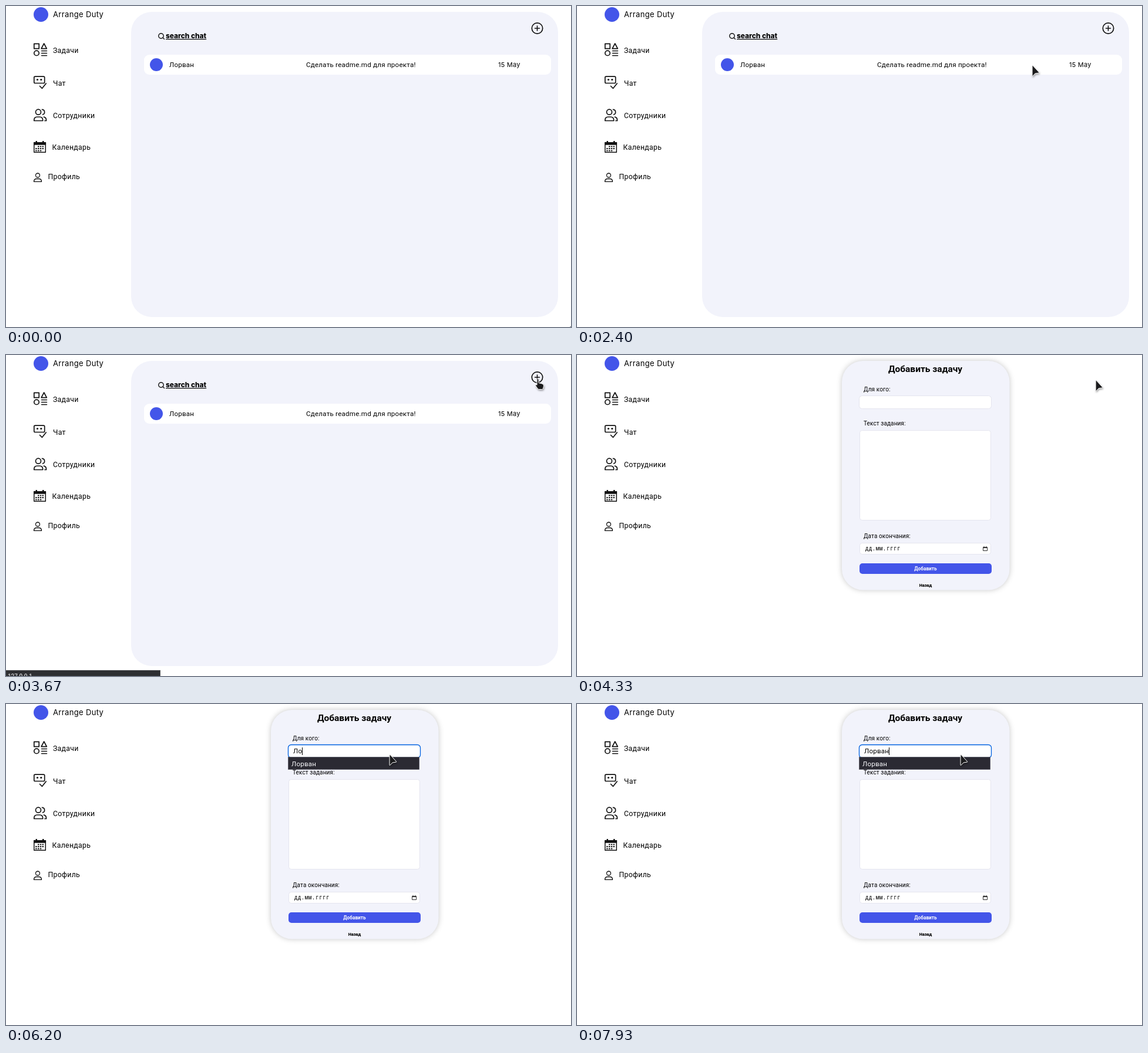
Animation, 962 px wide and 547 px high, one loop 8000 ms. Source, as an HTML page:

```html
<!DOCTYPE html>
<html lang="ru">
<head>
<meta charset="utf-8">
<title>Task board</title>
<style>
html, body { margin: 0; width: 100%; height: 100%; overflow: hidden; background: #fff; }
svg { display: block; width: 962px; height: 547px; font-family: Roboto, "Open Sans", sans-serif; }
text { fill: #000; }
.wide { font-family: Inter, sans-serif; }
.nav { font-size: 12.3px; letter-spacing: .3px; }
.row { font-size: 11.6px; letter-spacing: .22px; }
.label { font-size: 10px; letter-spacing: .1px; }
.icon { fill: none; stroke: #111; stroke-width: 1.7; stroke-linejoin: round; stroke-linecap: round; }
.solid { fill: #111; stroke: none; }
.field { fill: #fff; stroke: #e5e5ef; }
.card { filter: drop-shadow(0 0 5px rgba(0, 0, 0, .22)); }
.pointer { filter: drop-shadow(1px 2px 1.5px rgba(0, 0, 0, .35)); }
.pointer path { fill: #1b1b1d; stroke: #fff; stroke-width: 1; stroke-linejoin: round; }
</style>
</head>
<body>
<svg viewBox="0 0 962 547">
  <circle cx="59.5" cy="14.5" r="12.5" fill="#4355e9"/>
  <text class="wide" x="80" y="19" font-size="13" letter-spacing=".35">Arrange Duty</text>

  <g class="nav">
    <text x="80" y="80">Задачи</text>
    <text x="80" y="136">Чат</text>
    <text x="80" y="191">Сотрудники</text>
    <text x="78.5" y="245">Календарь</text>
    <text x="71.5" y="295">Профиль</text>
  </g>

  <g class="icon">
    <path d="M47.8 64.300h8.400v8.400H47.800zM64.700 64l4.600 8.700h-9.200z"/>
    <circle cx="52" cy="80.300" r="4.200"/>
    <path d="M60.500 76.500h9M60.500 80.500h9M60.500 84.500h9" stroke-width="1.500"/>
    <path d="M54 131.500h-4.500q-1.700 0-1.700-1.700v-8q0-1.700 1.700-1.700h14.500q1.700 0 1.700 1.700v8q0 1.700-1.700 1.700H54"/>
    <path d="M57.500 136.500l4 3.800 6.700-8.300"/>
    <g class="solid"><circle cx="53.500" cy="125.500" r="1.600"/><circle cx="59.800" cy="125.500" r="1.600"/></g>
    <circle cx="55" cy="180.700" r="4.500"/>
    <path d="M47.800 195.500v-1q0-5.500 5.500-5.500h3.800q5.500 0 5.500 5.500v1zM61.500 176.400a4.400 4.400 0 0 1 1 8.600M64.500 189.200q4 .8 4 5.300v1h-2.500"/>
    <g stroke-width="1.300">
      <circle cx="54" cy="288.500" r="3.500"/>
      <path d="M47.500 299.400q0-4.900 4.500-4.900h4q4.500 0 4.500 4.900z"/>
    </g>
    <path d="M47.800 233h19.500v16.200H47.800z" stroke-width="1.500"/>
    <path class="solid" d="M47.100 232h21v4.700h-21zM50.500 230h2.500v4h-2.500zM62 230h2.500v4H62z"/>
    <path d="M54 239.500h11.500M50.200 243h15.300M50.200 246.500h11.500" stroke-width="2" stroke-linecap="butt" stroke-dasharray="2.400 1.400"/>
  </g>

  <g id="list">
    <rect x="213" y="10" width="727" height="520" rx="35" fill="#f2f3fb"/>
    <g class="icon">
      <circle cx="264" cy="51" r="4.200" stroke-width="1.400"/>
      <path d="M267 54l2.500 2.500" stroke-width="1.400"/>
      <circle cx="904.500" cy="38" r="9.200"/>
      <path d="M900.500 38h8M904.500 34v8" stroke-width="1.600"/>
    </g>
    <text class="wide" x="272" y="55" font-size="11.9" font-weight="800" text-decoration="underline">search chat</text>
    <rect x="235" y="83" width="693" height="34" rx="9" fill="#fff"/>
    <circle cx="256" cy="100" r="11" fill="#4355e9"/>
    <g class="row">
      <text x="278" y="104">Лорван</text>
      <text x="511" y="104">Сделать readme.md для проекта!</text>
      <text class="wide" x="838" y="104" font-size="11">15 May</text>
    </g>
  </g>

  <g id="form">
    <rect class="card" x="451" y="10" width="285.500" height="390.500" rx="36" fill="#f2f3fb"/>
    <text x="593" y="29" font-size="15.500" font-weight="600" text-anchor="middle">Добавить задачу</text>
    <g class="label">
      <text x="488" y="62">Для кого:</text>
      <text x="488" y="120">Текст задания:</text>
      <text x="488" y="312">Дата окончания:</text>
    </g>
    <rect id="who" class="field" x="480.500" y="69.500" width="225" height="22" rx="5"/>
    <rect class="field" x="481.500" y="128.500" width="223" height="153" rx="4"/>
    <rect class="field" x="481.500" y="320.500" width="223" height="19" rx="4"/>
    <text x="490.500" y="333" font-size="10" font-weight="500" style="font-family:'Noto Sans Mono',monospace">дд.мм.гггг</text>
    <path d="M691.500 327.500h7v6h-7zM691.500 328.500h7M693 326v1M697 326v1" fill="none" stroke="#333"/>
    <rect x="481" y="355" width="225" height="18" rx="5" fill="#4355e9"/>
    <text x="593.500" y="367" font-size="8.300" font-weight="700" text-anchor="middle" style="fill:#fff">Добавить</text>
    <text x="593.500" y="395" font-size="7.300" font-weight="800" text-anchor="middle">Назад</text>
    <text id="typed" class="row" x="489" y="84"></text>
    <path id="caret" d="M.5 74v13" stroke="#000"/>
    <g id="menu">
      <rect x="480.500" y="90.500" width="223" height="21" fill="#2b2a33" stroke="#55545e" stroke-width=".7"/>
      <text class="row" x="486" y="106" style="fill:#fbfbfe">Лорван</text>
    </g>
  </g>

  <g id="status">
    <rect id="bar" x="-1" y="537.5" height="12" fill="#2e2f32" stroke="#55565a"/>
    <text x="3" y="551" font-size="10" style="fill:#fbfbfe">127.0.0.1</text>
  </g>
  <path id="speck" d="M960.500 546h1.500v1h-1.500z" fill="#555"/>

  <g id="arrow" class="pointer"><path d="M0 .6V17.500q.2 1 1 .3L5 13.500l6.300-1q1-.3.200-1.100L1-.1Q.1-.6 0 .6z"/></g>
  <g id="hand" class="pointer"><path d="M3 0q2 0 2 2.500v5l6 1.500q3 1 2.500 4l-1 4q-.5 1.500-2 1.500h-5q-1.500 0-2.500-1.500l-3.500-5q-.5-2 1.500-1.500l1 .7V2Q1.800 0 3 0z"/></g>
  <path id="beam" d="M-3-8h2.500l.5.700.500-.7H3M0-7.500v15M-3 8h2.500l.5-.7.500.7H3" fill="none" stroke="#444" stroke-width="1.300"/>
</svg>
<script>
const LOOP = 8000, TICK = 1000 / 15, NAME = 'Лорван';
const el = Object.fromEntries([...document.querySelectorAll('[id]')].map(n => [n.id, n]));

// [time, x, y]
const path = [
  [1867, 873, 82], [2060, 835, 92], [2270, 790, 101], [2530, 761, 102],
  [2740, 761, 102], [2930, 835, 76], [3070, 885, 52], [3330, 905, 40],
  [4270, 905, 40], [4470, 840, 50], [4670, 735, 66], [4870, 656, 82], [4930, 653, 83],
  [5070, 653, 83], [5130, 653, 88.5]
];
const keys = [
  [0, ''], [6070, 'Л'], [6200, 'Ло'], [6330, 'Лов'], [6470, 'Ловр'], [6600, 'Ловра'],
  [6870, 'Ловр'], [7070, 'Лов'], [7270, 'Ло'],
  [7600, 'Лор'], [7730, 'Лорв'], [7870, 'Лорва'], [7930, NAME]
];

const show = (node, on) => { node.style.display = on ? '' : 'none'; };
const place = (node, x, y) => node.setAttribute('transform', `translate(${x} ${y})`);
const between = (t, a, b) => t >= a && t < b;

function pointerAt(t) {
  const next = path.findIndex(p => p[0] > t);
  if (next < 0) return path.at(-1).slice(1);
  if (next === 0) return path[0].slice(1);
  const [t0, x0, y0] = path[next - 1], [t1, x1, y1] = path[next];
  const k = (t - t0) / (t1 - t0);
  return [x0 + (x1 - x0) * k, y0 + (y1 - y0) * k];
}

function draw(time) {
  const t = Math.floor((time + 4) / TICK) * TICK + 4;
  const text = keys.findLast(k => k[0] <= t)[1];
  const focused = t >= 4930;
  const open = text !== '' && NAME.startsWith(text);
  const formShown = t >= 3730;

  show(el.list, !formShown);
  show(el.form, formShown);
  show(el.speck, t < 330);

  show(el.status, between(t, 3467, 3800));
  el.status.style.opacity = t < 3530 ? .5 : 1;
  el.bar.setAttribute('width', t < 3667 ? 131.5 : 263.5);

  el.who.style.stroke = focused ? '#0061e0' : '';
  el.who.style.strokeWidth = focused ? 1.3 : 1;
  el.typed.textContent = text;
  show(el.menu, open);
  show(el.caret, between(t, 4930, 5467) || t >= 6000);
  place(el.caret, Math.round(489 + (text ? el.typed.getComputedTextLength() : 0)), 0);

  const [x, y] = pointerAt(t);
  const hand = between(t, 3330, 3800);
  const beam = t >= 4870 && !open;
  show(el.hand, hand);
  show(el.beam, beam);
  show(el.arrow, t >= 1867 && !hand && !beam);
  place(el.hand, x - 3, y);
  place(el.beam, x + .5, y + .5);
  place(el.arrow, x, open ? y - 2 : y);
}

function frame() {
  draw(performance.now() % LOOP);
  requestAnimationFrame(frame);
}
frame();
</script>
</body>
</html>
```
